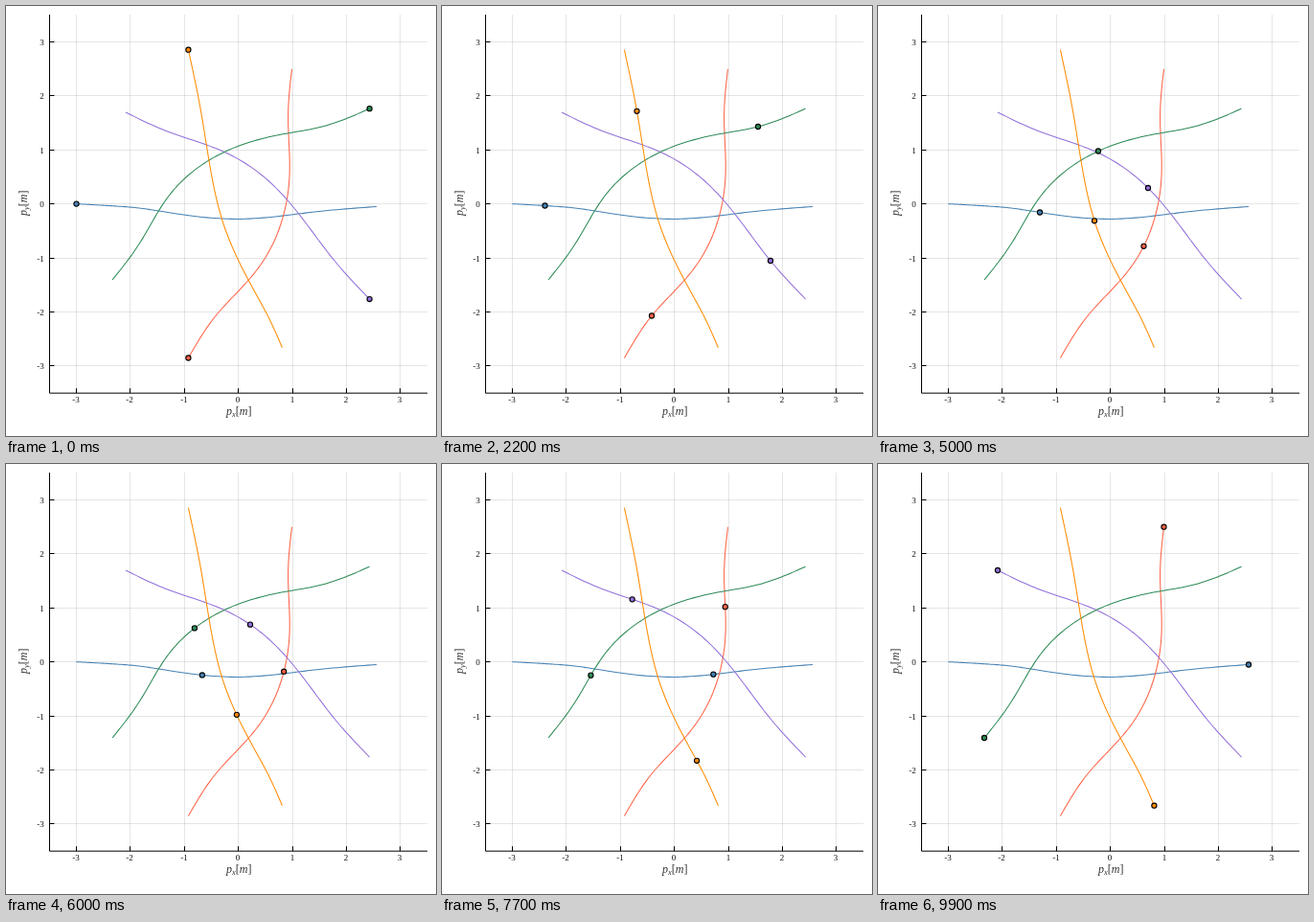
An HTML page for the animation above (10000 ms loop, 449x449 px).

```html
<!DOCTYPE html>
<html lang="en">
<head>
<meta charset="utf-8">
<title>Five crossing trajectories</title>
<style>
html, body { margin: 0; width: 100%; height: 100%; overflow: hidden; background: #fff; }
svg { display: block; width: 449px; height: 449px; }
text { font-family: "Liberation Serif", "Noto Serif", serif; font-size: 9px; fill: #111; }
.title { font-size: 12px; font-style: italic; text-anchor: middle; fill: #333; }
.sub { font-size: 8.5px; }
.up { font-style: normal; }
.grid { stroke: #000; stroke-opacity: .1; }
.axis { stroke: #000; fill: none; }
.path { fill: none; stroke-width: 1.05; }
.dot { stroke: #000; stroke-width: 1.1; }
</style>
</head>
<body>
<svg id="stage" viewBox="0 0 449 449"></svg>
<script>
const STEP = 100, STEPS = 100;
const UNIT = 56.4, X0 = 242.7, Y0 = 206.6;
const LEFT = 45.5, RIGHT = 440, TOP = 9, BOTTOM = 404.2;
const RADIUS = 3, RAMP = 6;

// Agents start evenly spaced on a circle, then pass these points at these steps
const steps = [0, 22, 37, 50, 70, 85, 99];
const agents = [
  ["#4682b4", [107.5, 208.5], [138.8, 211], [169, 215.5], [249.7, 222.3], [322, 215], [387, 209.5]],
  ["#ff6347", [219, 323.5], [253, 286.5], [277.5, 250.8], [296, 177.8], [294.6, 117], [298.5, 65.7]],
  ["#9370db", [343, 266], [312, 225.2], [282, 190], [223.5, 150.5], [170, 131.5], [125, 111]],
  ["#2e8b57", [330, 126], [278, 136], [230, 151.5], [170, 198.3], [140.3, 246.5], [111, 286]],
  ["#ff8c00", [203.5, 109.8], [213.5, 170.3], [226, 224.3], [256.7, 292.8], [275, 326.8], [288.4, 356.7]]
];

const toX = m => X0 + m * UNIT;
const toY = m => Y0 - m * UNIT;
const crisp = v => Math.floor(v) + 0.5;

// Progress that picks up speed from rest
const progress = step => step - RAMP * (1 - Math.exp(-step / RAMP));

// Natural cubic spline through (t[i], v[i])
function spline(t, v) {
  const n = t.length, m = Array(n).fill(0), c = Array(n).fill(0);
  for (let i = 1; i < n - 1; i++) {
    const a = t[i] - t[i - 1], b = t[i + 1] - t[i];
    const rhs = 6 * ((v[i + 1] - v[i]) / b - (v[i] - v[i - 1]) / a);
    const d = 2 * (a + b) - a * c[i - 1];
    c[i] = b / d;
    m[i] = (rhs - a * m[i - 1]) / d;
  }
  for (let i = n - 2; i > 0; i--) m[i] -= c[i] * m[i + 1];
  return s => {
    let i = 0;
    while (i < n - 2 && s > t[i + 1]) i++;
    const h = t[i + 1] - t[i], q = (s - t[i]) / h, p = 1 - q;
    return p * v[i] + q * v[i + 1] +
      ((p ** 3 - p) * m[i] + (q ** 3 - q) * m[i + 1]) * h * h / 6;
  };
}

const stage = document.getElementById("stage");

function add(tag, attrs, content = "") {
  const el = document.createElementNS("http://www.w3.org/2000/svg", tag);
  for (const key in attrs) el.setAttribute(key, attrs[key]);
  el.innerHTML = content;
  return stage.appendChild(el);
}

const line = (cls, x1, y1, x2, y2) => add("line", { class: cls, x1, y1, x2, y2 });

function drawAxes() {
  const ticks = Array.from({ length: 7 }, (_, i) => {
    const value = i - 3;
    return { value, x: crisp(toX(value)), y: crisp(toY(value)) };
  });
  for (const { x, y } of ticks) {
    line("grid", x, TOP, x, BOTTOM);
    line("grid", LEFT, y, RIGHT, y);
  }
  add("path", { class: "axis", d: `M${LEFT} ${TOP}V${BOTTOM}H${RIGHT}` });
  for (const { value, x, y } of ticks) {
    line("axis", x, BOTTOM, x, BOTTOM - 5);
    line("axis", LEFT, y, LEFT + 5, y);
    add("text", { x: x - 0.6, y: 414, "text-anchor": "middle" }, value);
    add("text", { x: 39.7, y: y + 3.2, "text-anchor": "end" }, value);
  }
  const title = axis => `p<tspan class="sub" dy="2">${axis}</tspan>` +
    `<tspan class="up" dy="-2">[</tspan>m<tspan class="up">]</tspan>`;
  add("text", { class: "title", x: 243.3, y: 427 }, title("x"));
  add("text", { class: "title", transform: "translate(21.5 205.8) rotate(-90)" }, title("y"));
}

function drawAgent([color, ...stops], index) {
  const angle = Math.PI * (1 + 2 * index / agents.length);
  const start = [toX(RADIUS * Math.cos(angle)), toY(RADIUS * Math.sin(angle))];
  const points = [start, ...stops];
  const times = steps.map(progress);
  const [fx, fy] = [0, 1].map(axis => spline(times, points.map(p => p[axis])));
  const at = step => [fx(progress(step)), fy(progress(step))];

  const trail = Array.from({ length: STEPS }, (_, step) => at(step).map(v => v.toFixed(2)));
  add("polyline", { class: "path", stroke: color, points: trail.join(" ") });
  const dot = add("circle", { class: "dot", r: 2.6, fill: color });
  return step => {
    const [x, y] = at(step);
    dot.setAttribute("cx", x);
    dot.setAttribute("cy", y);
  };
}

drawAxes();
const movers = agents.map(drawAgent);
const begin = performance.now();

function render() {
  const elapsed = Math.max(0, performance.now() - begin);
  const step = Math.floor(elapsed / STEP) % STEPS;
  movers.forEach(move => move(step));
  requestAnimationFrame(render);
}
render();
</script>
</body>
</html>
```
